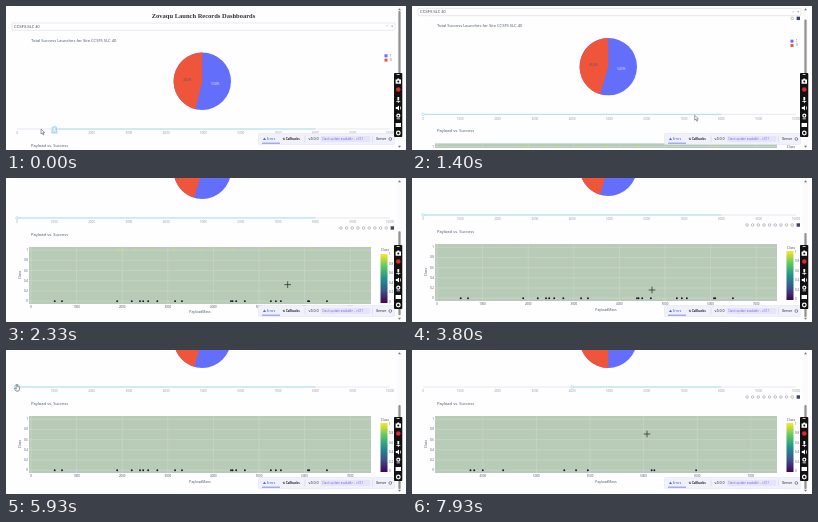
Animation of 400x144 px, one loop 8 s. Source, as an HTML page:

```html
<!DOCTYPE html>
<html lang="en">
<head>
<meta charset="utf-8">
<title>Launch dashboard</title>
<style>
  html, body { margin: 0; width: 100%; height: 100%; overflow: hidden; background: #fefdff; }
  svg { display: block; width: 100%; height: 100%; }
  text { font: 4.1px "Open Sans", sans-serif; fill: #44546f; dominant-baseline: central; }
  .heading { font: bold 6.5px "Liberation Serif", serif; fill: #333; }
  .choice { font: 3.65px "Liberation Sans", sans-serif; fill: #444; }
  .axis { font-size: 3.5px; }
  .mark { font-size: 3px; fill: #999; }
  .tick { font-size: 2.9px; }
  .dev { font: 2.95px Inter, sans-serif; fill: #222; }
  .mid { text-anchor: middle; }
  .end { text-anchor: end; }
</style>
</head>
<body>
<svg viewBox="0 0 400 144">
  <defs>
    <linearGradient id="viridis" x2="0" y2="1">
      <stop offset="0" stop-color="#fde725"/>
      <stop offset=".25" stop-color="#5ec962"/>
      <stop offset=".5" stop-color="#21918c"/>
      <stop offset=".75" stop-color="#3b528b"/>
      <stop offset="1" stop-color="#440154"/>
    </linearGradient>
  </defs>
  <g id="page">
    <text class="heading mid" x="197.5" y="9">Zovaqu Launch Records Dashboards</text>
    <rect x="6" y="17" width="383" height="7.3" rx=".8" fill="none" stroke="#d4d4d4" stroke-width=".5"/>
    <text class="choice" x="8" y="20.5">CCSFS SLC 40</text>
    <text class="mark mid" x="381" y="20.3">×</text>
    <path d="M385 19.8h2.4l-1.2 1.4z" fill="#999"/>

    <text x="25" y="34">Total Success Launches for Site CCSFS SLC 40</text>
    <g transform="translate(196.3 75.3)">
      <circle r="28.7" fill="#636efa"/>
      <path id="redSlice" fill="#ef553b"/>
      <text class="tick mid" id="blueShare" x="13" y="2.5" style="fill:#fff"></text>
      <text class="tick mid" id="redShare" x="-15" y="-1.3"></text>
    </g>
    <path d="M378.5 48.3h3v3h-3z" fill="#636efa"/>
    <path d="M378.5 52.6h3v3h-3z" fill="#ef553b"/>
    <text class="tick" x="384" y="49.8">1</text>
    <text class="tick" x="384" y="54.1">0</text>
    <g id="pieBar"></g>

    <path d="M11 123H384" stroke="#e9e9e9"/>
    <path id="range" stroke="#abe2fb"/>
    <g id="marks"></g>
    <g id="handle">
      <rect id="focus" x="-2.2" y="-2.2" width="4.4" height="5.6" rx="1" fill="#d5f0fc" stroke="#6ccbf7" stroke-width=".6"/>
      <circle r="1.3" fill="#fff" stroke="#8fd6f7" stroke-width=".6"/>
    </g>

    <text x="25" y="139.5">Payload vs. Success</text>
    <g id="plotBar"></g>
    <rect x="23" y="152" width="342" height="57" fill="#b7cbb7"/>
    <g id="yAxis"></g>
    <g id="fullView"></g>
    <g id="zoomView"></g>
    <text class="axis mid" x="194" y="217">PayloadMass</text>
    <text class="axis mid" transform="translate(13.5 180) rotate(-90)">Class</text>
    <text class="axis mid" x="379" y="155">Class</text>
    <rect x="374.5" y="159" width="7" height="49" fill="url(#viridis)"/>
  </g>

  <rect y="142" width="400" height="2" fill="#fefdff"/>
  <rect x="391" width="5" height="142" fill="#fbfafc"/>
  <rect id="thumb" x="392.4" width="2.2" height="84" rx="1" fill="#909090"/>
  <path d="M392 4.2h3l-1.5-2zM392 139.8h3l-1.5 2z" fill="#777"/>

  <rect x="252.5" y="127.5" width="136" height="11" rx="1" fill="#f0f1fb" stroke="#dfe1ee" stroke-width=".5"/>
  <text class="dev" x="257" y="133" style="fill:#3b52e0">⚠ Errors</text>
  <path d="M256 137.2h18" stroke="#4a5ff0" stroke-width=".7"/>
  <text class="dev" x="276.5" y="133" style="font-weight:bold">⇅ Callbacks</text>
  <path d="M299 129.5v7M366.5 129.5v7" stroke="#c5c8dc" stroke-width=".4"/>
  <text class="dev" x="302.5" y="133" style="font-size:3.5px">v3.0.0</text>
  <rect x="314.8" y="130" width="49.5" height="6" rx="1" fill="#e6e4fa"/>
  <text class="dev" x="316.5" y="133" style="fill:#7a6be0">Dash update available - v3.1.1</text>
  <text class="dev" x="370" y="133" style="font-size:3.3px">Server</text>
  <circle cx="384.3" cy="133" r="1.4" fill="none" stroke="#333" stroke-width=".5"/>

  <g id="recorder" fill="#fff">
    <rect x="388" y="67" width="8.3" height="64" rx="1" fill="#111"/>
    <path d="M390.6 68.3h3v.7h-3zM389.6 73.5h1.4l.6-1h1.4l.6 1h1.4v4.2h-5.4z"/>
    <circle cx="392.3" cy="75.5" r="1" fill="#111"/>
    <circle cx="392.3" cy="83.5" r="2.3" fill="#e3262e"/>
    <path d="M391.4 91h1.8v3.4h-1.8zM390.3 95h4v.7h-1.6v1.2h-.8v-1.2h-1.6z"/>
    <path d="M389.8 101h1.4l1.8-1.6v5.2l-1.8-1.6h-1.4zM394 100.6h.7v2.8h-.7z"/>
    <circle cx="392.3" cy="109.7" r="2.1"/>
    <circle cx="392.3" cy="109.7" r=".9" fill="#111"/>
    <path d="M390.6 112.4h3.4v.8h-3.4zM389.6 117h5.4v4h-5.4z"/>
    <circle cx="392.3" cy="127" r="1.8" fill="none" stroke="#fff" stroke-width="1.2"/>
  </g>

  <path id="arrow" d="M0 0v5l1.2-1.1.9 2 .9-.4-.9-1.9h1.6z" fill="#fff" stroke="#444" stroke-width=".5"/>
  <path id="hand" d="M-.7-2.4h1.2v2l2 .5v2.3l-.8 1.6h-2.6l-1.7-2.3.6-.6 1.3.8z" fill="#fff" stroke="#444" stroke-width=".5"/>
  <path id="cross" d="M-3.3 0h6.6M0-3.3v6.6" stroke="#333" stroke-width=".8"/>
</svg>
<script>
const LOOP = 8000, FRAME = 1000 / 15, SCROLL_END = 86;
const $ = id => document.getElementById(id);
const repeat = (count, make) => Array.from({length: count}, (_, i) => make(i)).join('');
const label = (cls, x, y, s) => `<text class="${cls}" x="${x}" y="${y}">${s}</text>`;
const line = d => `<path d="${d}" stroke="#d3e0d3" stroke-width=".4"/>`;
const dot = (x, y, fill) => `<circle cx="${x}" cy="${y}" r=".95" fill="${fill}"/>`;
const show = (id, on) => $(id).setAttribute('display', on ? 'inline' : 'none');
const move = (id, x, y) => $(id).setAttribute('transform', `translate(${x} ${y})`);
const clamp = v => Math.min(1, Math.max(0, v));

// Slider
const markX = i => 11 + 37.3 * i;
const nearestMark = x => Math.max(0, Math.round((x - 11) / 37.3));
$('marks').innerHTML = repeat(11, i => label('mark mid', markX(i), 127.3, i * 1000));

// Chart toolbars: evenly spaced outlines ending in a plain square
function toolbar(id, count, y) {
  $(id).innerHTML = repeat(count, i =>
    `<circle cx="${380.2 - 5.65 * i}" cy="${y}" r="1.3" fill="none" stroke="#aaa" stroke-width=".7"/>`) +
    `<rect x="384.6" y="${y - 1.7}" width="3.4" height="3.4" fill="#3b4560"/>`;
}
toolbar('pieBar', 1, 27);
toolbar('plotBar', 9, 133);

// Scatter plot
const full = v => 25 + v * 0.0456;
const zoom = v => 70.8 + (v - 4500) * 0.1072;
const failures = [520, 680, 1890, 2210, 2390, 2460, 2570, 2770, 3160, 3310,
  4385, 4420, 4500, 4690, 5260, 5370, 5480, 6075, 6100, 6490];
const failureDots = (scale, min) => failures.filter(v => v > min).map(v => dot(scale(v), 206.2, '#1b1430')).join('');
const success = i => 1930 + 4200 * (i / 8) ** 1.8;
const xAxis = (scale, start, step, count) => repeat(count, i => {
  const value = start + i * step, x = scale(value);
  return line(`M${x} 152v57`) + label('tick mid', x, 212, value);
});
$('yAxis').innerHTML = repeat(6, i => {
  const y = 206.2 - i * 10.2, value = i / 5;
  return line(`M23 ${y}H365`) + label('tick end', 22, y, value) + label('tick', 383, 207 - i * 9.5, value);
});
$('fullView').innerHTML = xAxis(full, 0, 1000, 8) + failureDots(full, 0) +
  `<g id="successes" opacity=".7">${repeat(9, i => dot(full(success(i)), 155.2, '#e9e03a'))}</g>`;
$('zoomView').innerHTML = xAxis(zoom, 4500, 500, 6) + failureDots(zoom, 4000);

function drawPie(blue) {
  const a = blue * 2 * Math.PI, r = 28.7;
  $('redSlice').setAttribute('d', `M0 0L${r * Math.sin(a)} ${-r * Math.cos(a)}A${r} ${r} 0 0 1 0 ${-r}z`);
  $('blueShare').textContent = (blue * 100).toFixed(1) + '%';
  $('redShare').textContent = (100 - blue * 100).toFixed(1) + '%';
}

// Mouse stops: time, x, y
const stops = [[0, 35, 123], [330, 11, 123], [530, 11, 123], [1130, 283, 110], [2930, 281, 105],
  [3600, 253, 82], [3800, 240, 112], [4600, 236, 116], [4800, 240, 68], [5270, 98, 46],
  [5930, 11, 37], [6330, 13, 37], [6930, 160, 37], [7530, 172, 46], [7930, 235, 84]];

function mouseAt(t) {
  const a = stops.findLast(s => s[0] <= t);
  const b = stops.find(s => s[0] > t) ?? a;
  const k = a === b ? 0 : (t - a[0]) / (b[0] - a[0]);
  return [a[1] + (b[1] - a[1]) * k, a[2] + (b[2] - a[2]) * k];
}

function draw(now) {
  // The screen refreshes 15 times a second
  const t = Math.floor((now % LOOP + 5) / FRAME) * FRAME;
  const [x, y] = mouseAt(t);
  const scroll = SCROLL_END * (1 - (1 - clamp((t - 1237) / 1176)) ** 1.25);
  move('page', 0, -scroll);
  $('thumb').setAttribute('y', 5 + scroll * 0.58);

  const dragging = t < 470 || (t > 5900 && t < 7000);
  const low = dragging ? nearestMark(x) : t < 5900 ? 0 : 4;
  move('handle', markX(low), 123);
  $('range').setAttribute('d', `M${markX(low)} 123H${markX(8)}`);
  show('focus', dragging);

  const zoomed = t > 7500;
  drawPie(t < 600 ? 7 / 13 : zoomed ? 0.5 : 6 / 11);
  show('fullView', !zoomed);
  show('zoomView', zoomed);
  show('successes', t < 3100);
  show('pieBar', t > 650 && t < 1700);
  show('plotBar', (t > 1700 && t < 5900) || t > 7750);

  const overPlot = x > 23 && x < 365 && y + scroll > 152;
  const pointer = overPlot ? 'cross' : dragging && scroll > 0 ? 'hand' : 'arrow';
  for (const id of ['arrow', 'hand', 'cross']) show(id, id === pointer);
  move(pointer, x, y);
}

let start;
function tick(now) {
  start ??= now;
  draw(now - start);
  requestAnimationFrame(tick);
}
draw(0);
requestAnimationFrame(tick);
</script>
</body>
</html>
```
